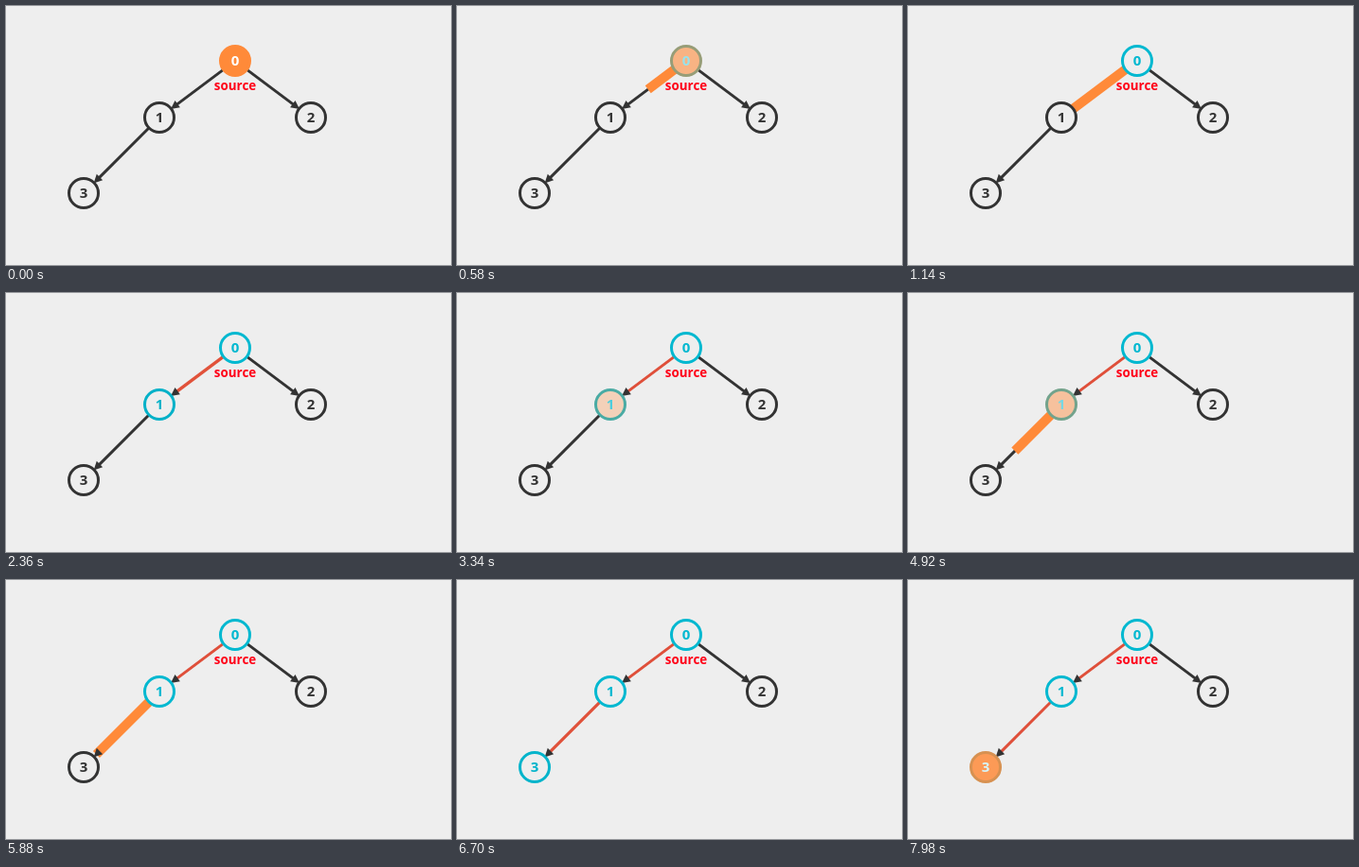
An HTML page with a canvas that plays this animation: 470 px wide and 274 px high, repeating every 8 s.

```html
<!DOCTYPE html>
<html lang="en">
<head>
<meta charset="utf-8">
<title>Depth-first search</title>
<style>
  html, body { margin: 0; width: 100%; height: 100%; overflow: hidden; background: #eee; }
  canvas { display: block; }
</style>
</head>
<body>
<canvas width="470" height="274"></canvas>
<script>
const ctx = document.querySelector('canvas').getContext('2d');

const LOOP = 8000;
const STEP = 1200;
const PAPER = [238, 238, 238];
const INK = [51, 51, 51];
const ORANGE = [255, 138, 57];
const CYAN = [0, 184, 208];
const RED = [223, 79, 58];
const WHITE = [255, 255, 255];
const THIN = 3, THICK = 10;

const plain = { fill: PAPER, ring: INK, text: INK };
const visited = { fill: PAPER, ring: CYAN, text: CYAN };
const active = { fill: ORANGE, ring: ORANGE, text: WHITE };

// Each node passes through its looks, one change per start time.
const nodes = [
  { x: 242, y: 58, looks: [active, visited], starts: [20] },
  { x: 162, y: 118, looks: [plain, visited, active, visited], starts: [1440, 2840, 4300] },
  { x: 322, y: 118, looks: [plain], starts: [] },
  { x: 82, y: 198, looks: [plain, visited, active], starts: [5740, 7190] }
];

const edges = [
  { from: nodes[0], to: nodes[1], grow: 20, settle: 1440 },
  { from: nodes[0], to: nodes[2], grow: Infinity, settle: Infinity },
  { from: nodes[1], to: nodes[3], grow: 4300, settle: 5740 }
];

const lerp = (a, b, p) => a + (b - a) * p;
const mix = (a, b, p) => a.map((v, i) => lerp(v, b[i], p));
const css = color => `rgb(${color.map(Math.round)})`;

// Cubic ease in and out
function progress(time, start) {
  const t = Math.min(1, Math.max(0, (time - start) / STEP));
  return t < 0.5 ? 4 * t ** 3 : 1 - 4 * (1 - t) ** 3;
}

function line(x1, x2, color, width) {
  ctx.strokeStyle = css(color);
  ctx.lineWidth = width;
  ctx.beginPath();
  ctx.moveTo(x1, 0);
  ctx.lineTo(x2, 0);
  ctx.stroke();
}

function arrowHead(tip) {
  ctx.fillStyle = css(INK);
  ctx.beginPath();
  ctx.moveTo(tip, 0);
  ctx.lineTo(tip - 9, -4.5);
  ctx.lineTo(tip - 9, 4.5);
  ctx.fill();
}

function drawEdge({ from, to, grow, settle }, time) {
  const dx = to.x - from.x, dy = to.y - from.y;
  const length = Math.hypot(dx, dy);
  const start = 16, end = length - 16;
  ctx.save();
  ctx.translate(from.x, from.y);
  ctx.rotate(Math.atan2(dy, dx));
  if (time < settle) {
    line(start, end - 3, INK, THIN);
    arrowHead(end + 1);
    const p = progress(time, grow);
    if (p > 0) line(start, lerp(start, length, p), ORANGE, THICK);
  } else {
    const p = progress(time, settle);
    line(start, end - 3, mix(ORANGE, RED, p), lerp(THICK, THIN, p));
    arrowHead(end + 1);
  }
  ctx.restore();
}

function nodeColor({ looks, starts }, part, time) {
  return starts.reduce(
    (color, start, i) => mix(color, looks[i + 1][part], progress(time, start)),
    looks[0][part]);
}

function drawNode(node, index, time) {
  ctx.beginPath();
  ctx.arc(node.x, node.y, 15.5, 0, 2 * Math.PI);
  ctx.fillStyle = css(nodeColor(node, 'fill', time));
  ctx.fill();
  ctx.strokeStyle = css(nodeColor(node, 'ring', time));
  ctx.lineWidth = 3;
  ctx.stroke();
  ctx.font = 'bold 15px "Open Sans", sans-serif';
  ctx.fillStyle = css(nodeColor(node, 'text', time));
  ctx.fillText(index, node.x, node.y + 5);
}

function draw(time) {
  ctx.fillStyle = css(PAPER);
  ctx.fillRect(0, 0, 470, 274);
  ctx.textAlign = 'center';
  edges.forEach(edge => drawEdge(edge, time));
  nodes.forEach((node, index) => drawNode(node, index, time));
  ctx.font = 'bold 13.4px "Open Sans", sans-serif';
  ctx.fillStyle = '#ff0018';
  ctx.fillText('source', 242, 89);
}

const began = performance.now();
function frame() {
  draw((performance.now() - began) % LOOP);
  requestAnimationFrame(frame);
}
frame();
</script>
</body>
</html>
```
